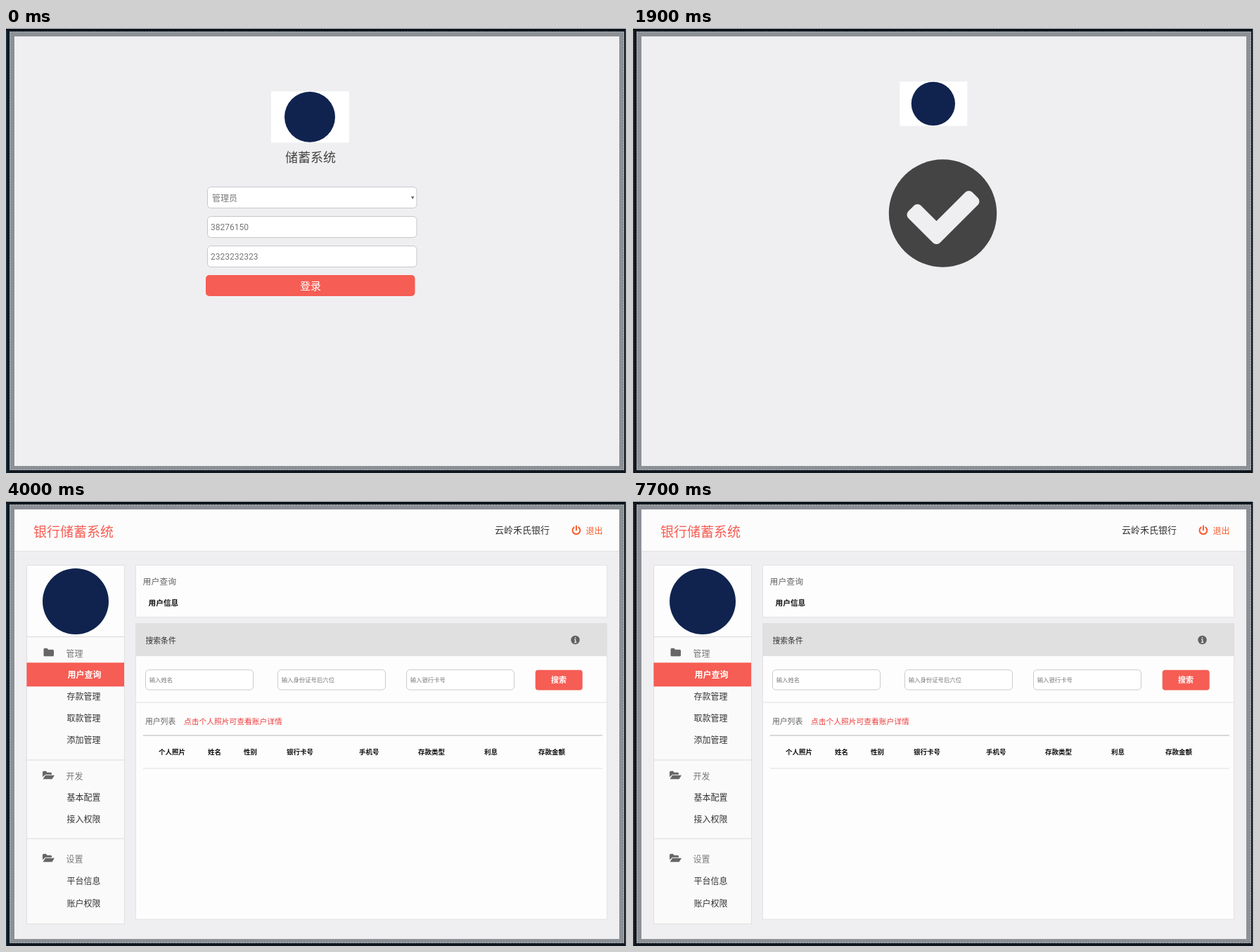
These frames come from a looping animation (883 px wide and 634 px high, 8000 ms). An HTML page:

```html
<!DOCTYPE html>
<html lang="zh-CN">
<head>
<meta charset="utf-8">
<title>银行储蓄系统</title>
<style>
html, body { margin: 0; width: 100%; height: 100%; overflow: hidden; background: #efeff1; }
svg { display: block; width: 883px; height: 634px; }
text { font-family: "Noto Sans CJK SC", "Noto Sans CJK", sans-serif; }
.num { font-family: Roboto, sans-serif; }
</style>
</head>
<body>
<svg viewBox="0 0 883 634">
  <rect width="883" height="634" fill="#d8dadd"/>
  <rect y="1" width="881.5" height="633" fill="#11171f"/>
  <path d="M.5 4V634" stroke="#1d4258"/>
  <rect x="5" y="5" width="874" height="625" fill="#8b9196"/>
  <rect x="6" y="5.5" width="872.5" height="624" fill="none" stroke="#b4b9bc" stroke-dasharray="2 2"/>
  <rect x="12" y="12" width="860" height="612" fill="#efeff1"/>

  <g id="login"></g>
  <g id="logo">
    <rect width="111" height="73" fill="#fff"/>
    <circle cx="55" cy="36.5" r="36" fill="#10234f"/>
  </g>
  <g id="success">
    <g id="tick">
      <circle r="76.7" fill="#444"/>
      <path d="M-9 21L37-25L45-17L-9 37L-44 2L-36-6Z" fill="#efeff1" stroke="#efeff1"
        stroke-width="14" stroke-linejoin="round"/>
    </g>
  </g>
  <g id="dashboard"></g>
</svg>
<script>
const RED = '#f65d54';
const $ = id => document.getElementById(id);
const clamp = v => Math.max(0, Math.min(1, v));
const lerp = (a, b, p) => a + (b - a) * p;

function add(parent, tag, attrs, content = '') {
  const node = document.createElementNS('http://www.w3.org/2000/svg', tag);
  for (const key in attrs) node.setAttribute(key, attrs[key]);
  node.textContent = content;
  return parent.appendChild(node);
}
// Text is placed by its left edge and vertical centre.
const label = (parent, x, cy, size, content, fill = '#444', extra = {}) =>
  add(parent, 'text', { x, y: cy + size * .38, 'font-size': size, fill, ...extra }, content);
const rect = (parent, x, y, width, height, fill, extra = {}) =>
  add(parent, 'rect', { x, y, width, height, fill, ...extra });
const box = (parent, x, y, w, h, stroke = '#e3e3e5', rx = 0, fill = '#fdfdfd') =>
  rect(parent, x + .5, y + .5, w - 1, h - 1, fill, { stroke, rx });
const path = (parent, d, extra) => add(parent, 'path', { d, fill: 'none', ...extra });
const line = (parent, x1, x2, y, stroke = '#e0e0e2', width = 1) =>
  path(parent, `M${x1} ${y}H${x2}`, { stroke, 'stroke-width': width });
const bold = { 'font-weight': 700 };

// Login form
const login = $('login');
const oldTitle = label(login, 397, 184, 18, '储蓄系统');
const newTitle = label(login, 370, 179, 18, '渠道商管理平台');
for (const y of [226, 268, 310]) box(login, 286, y, 298.5, 31, '#c6c7ca', 5, '#fff');
label(login, 293, 242, 12, '管理员', '#777');
path(login, 'M576 240h4.4l-2.2 4Z', { fill: '#666' });
label(login, 291, 283, 12, '38276150', '#777', { class: 'num' });
label(login, 291, 325.2, 12, '2323232323', '#777', { class: 'num' });
const loginCaret = rect(login, 358, 319, 1, 13, '#333');
rect(login, 284, 352, 297.5, 30, RED, { rx: 5 });
label(login, 418, 367, 15, '登录', '#fff');

// Success message
const message = label($('success'), 406, 390.5, 13.2, '登陆成功', '#222');

// Dashboard: header
const dash = $('dashboard');
rect(dash, 12, 12, 860, 612, '#efeff1');
rect(dash, 12, 12, 860, 59, '#fcfcfc');
line(dash, 12, 872, 71.5);
label(dash, 39, 43.5, 19, '银行储蓄系统', RED);
label(dash, 695, 41.5, 13, '云岭禾氏银行', '#333');
path(dash, 'M807.6 37.6a5.4 5.4 0 1 0 6.6 0M810.9 35.5v6',
  { stroke: '#fb5a2c', 'stroke-width': 2, 'stroke-linecap': 'round' });
label(dash, 824.5, 42, 12, '退出', '#fb5a2c');

// Dashboard: sidebar
box(dash, 29, 91, 140, 512, '#e0e0e2', 0, '#fafafa');
rect(dash, 31, 93, 136, 99, '#fdfdfd');
add(dash, 'circle', { cx: 99, cy: 143, r: 47, fill: '#10234f' });
for (const y of [193.5, 369, 481]) line(dash, 30, 168, y, '#dadadc');
rect(dash, 29.4, 230.3, 138.6, 34, RED);

const closedFolder = 'M53.5 10V1.5q0-1.5 1.5-1.5h3.5l1.5 2h6.5q1.5 0 1.5 1.5v6.5q0 1.5-1.5 1.5h-11.5q-1.5 0-1.5-1.5Z';
const openFolder = 'M52 8.5V1.5q0-1.5 1.5-1.5h3.5l1.5 2h5q1.5 0 1.5 1.5v1.5h-9ZM52.5 11.5l3.5-5.5h13l-3.5 5.5Z';
const menu = [
  ['管理', 217, closedFolder, [['用户查询', 247], ['存款管理', 278.5], ['取款管理', 309.5], ['添加管理', 340.5]]],
  ['开发', 392, openFolder, [['基本配置', 422.5], ['接入权限', 453.5]]],
  ['设置', 510, openFolder, [['平台信息', 541.5], ['账户权限', 573]]]
];
for (const [heading, y, folder, items] of menu) {
  path(dash, folder, { fill: '#666', transform: `translate(0 ${y - 7.3})` });
  label(dash, 85.5, y, 12, heading, '#777');
  for (const [name, cy] of items) {
    const active = name === '用户查询';
    label(dash, active ? 87.5 : 86.5, cy, 12, name, active ? '#fff' : '#333', active ? bold : {});
  }
}

// Dashboard: search and list
box(dash, 184, 91, 671, 75);
label(dash, 194.5, 114.5, 11.9, '用户查询', '#666');
label(dash, 202.5, 145, 10.7, '用户信息', '#111', bold);
box(dash, 184, 174, 671, 422.5);
rect(dash, 184, 174, 671, 47, '#e0e0e0');
label(dash, 198.5, 198.5, 10.8, '搜索条件', '#333');
add(dash, 'circle', { cx: 809.5, cy: 198, r: 6.2, fill: '#606060' });
path(dash, 'M809.5 194v1.8M808 197.5h1.7v4M807.8 201.5h3.6', { stroke: '#e0e0e0', 'stroke-width': 1.5 });

for (const [x, hint] of [[198, '输入姓名'], [386, '输入身份证号后六位'], [569, '输入银行卡号']]) {
  box(dash, x, 240, 154, 29.5, '#cbcbcd', 5, '#fff');
  label(dash, x + 5.7, 255, 8.4, hint, '#777');
}
const searchCaret = rect(dash, 204, 250, 1, 10, '#333');
rect(dash, 752.7, 240.8, 67, 28.8, RED, { rx: 4 });
label(dash, 775, 255, 11, '搜索', '#fff', bold);
line(dash, 185, 854, 287);
label(dash, 198, 314, 10.8, '用户列表', '#666');
label(dash, 253, 314, 10.75, '点击个人照片可查看账户详情', '#ee3b3b');
line(dash, 195, 848, 334, '#d8d8da', 2);
for (const [x, name] of [[217, '个人照片'], [287, '姓名'], [338, '性别'], [399, '银行卡号'],
  [502, '手机号'], [586, '存款类型'], [680, '利息'], [757, '存款金额']]) {
  label(dash, x, 357.5, 9.5, name, '#111', bold);
}
line(dash, 195, 848, 381);

const show = (node, on) => node.setAttribute('visibility', on ? 'visible' : 'hidden');
const fade = (node, opacity) => node.setAttribute('opacity', opacity);
const place = (node, x, y, scale = 1) =>
  node.setAttribute('transform', `translate(${x} ${y}) scale(${scale})`);

// Sideways shake of the tick: first on arrival, then gently with the message.
function tickX(t) {
  const wave = Math.cos(t / 200 * Math.PI);
  if (t >= 1800 && t < 2100) return 431 - 9.5 * Math.cos((t - 1800) / 100 * Math.PI);
  if (t >= 2600 && t < 3500) return 431 + 4 * wave * Math.exp((2800 - t) / 500);
  return 431;
}

function render(time) {
  const t = Math.floor(time / 100) * 100; // motion advances ten times a second
  const started = t >= 1000;
  const p = started ? clamp((t - 900) / 800) : 0;
  show(oldTitle, !started);
  show(newTitle, started);
  show(loginCaret, started);
  fade(login, 1 - p);
  fade($('success'), p);
  place($('logo'), lerp(377, 379.3, p), lerp(90.3, 76.3, p), lerp(1, .865, p));
  place($('tick'), tickX(t), 264);
  fade(message, clamp((t - 2500) / 300));
  show(dash, t >= 3900);
  const caretOn = [[6000, 6400], [6800, 7100], [7300, 7700]].some(([on, off]) => t >= on && t < off);
  fade(searchCaret, caretOn ? 1 : 0);
}

function frame() {
  render(performance.now() % 8000);
  requestAnimationFrame(frame);
}
frame();
</script>
</body>
</html>
```
